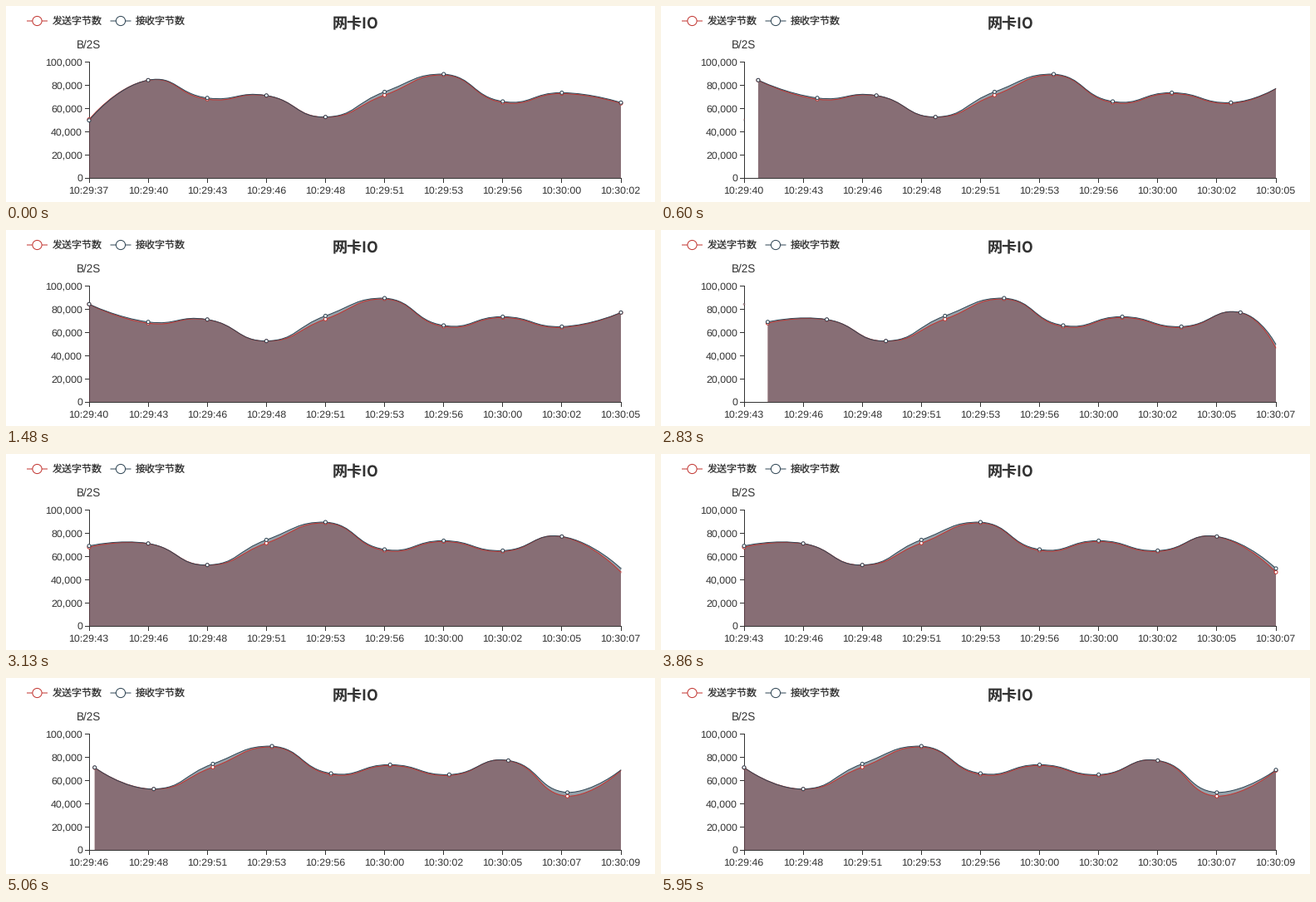
Write a matplotlib script that moves like this. It is 781 px wide and 236 px high and loops after 8000 ms.

```python
import numpy as np
import matplotlib.pyplot as plt
from matplotlib.animation import FuncAnimation
from matplotlib.colors import to_rgb
from matplotlib.patches import Circle, PathPatch
from matplotlib.path import Path

W, H, DPI = 781, 236, 64
PT = 72 / DPI                      # points per pixel
LOOP, INTERVAL = 8000, 20
LEFT, RIGHT, TOP, BASE = 100, 740, 67, 207
SHOWN = 10
STEP = (RIGHT - LEFT) / (SHOWN - 1)
RED, NAVY, INK = "#c23531", "#2f4554", "#333333"

plt.rcParams["text.hinting"] = "none"

# Thousands of bytes per sample
SENT = [50.3, 84.0, 67.7, 70.7, 52.3, 71.2, 88.6, 64.9, 72.5, 64.1, 76.7, 46.2, 68.3]
RECEIVED = [49.5, 84.1, 68.8, 70.9, 52.4, 74.0, 89.3, 65.8, 73.3, 64.8, 76.9, 49.4, 68.8]
TIMES = ["10:29:%02d" % s for s in (37, 40, 43, 46, 48, 51, 53, 56)]
TIMES += ["10:30:%02d" % s for s in (0, 2, 5, 7, 9)]

# (time the new sample shows, how far its tween has run by then), in ms
SHIFTS = [(600, 114), (2830, 79), (4910, 17)]
TICK = 146.5                       # screen refresh while tweening
SLIDE, GROW = 300, 1000


def to_y(values):
    return BASE - np.asarray(values) * (BASE - TOP) / 100


def smooth_path(pts, k=0.5):
    """Cubic curve through pts, handles kept inside their bounding box."""
    lo, hi = pts.min(axis=0), pts.max(axis=0)
    verts, handle = [pts[0]], pts[0]
    for i in range(1, len(pts)):
        p = pts[i]
        before = after = p
        if i < len(pts) - 1:
            span = pts[i + 1] - pts[i - 1]
            a = np.hypot(*(p - pts[i - 1]))
            b = np.hypot(*(pts[i + 1] - p))
            before = p - span * k * a / (a + b)
            after = p + span * k * b / (a + b)
        verts += [np.clip(handle, lo, hi), np.clip(before, lo, hi), p]
        handle = after
    return Path(verts, [Path.MOVETO] + [Path.CURVE4] * (len(verts) - 1))


def area_path(curve):
    v = curve.vertices
    foot = [(v[-1, 0], BASE), (v[0, 0], BASE), v[0]]
    codes = list(curve.codes) + [Path.LINETO, Path.LINETO, Path.CLOSEPOLY]
    return Path(np.vstack([v, foot]), codes)


fig = plt.figure(figsize=(W / DPI, H / DPI), dpi=DPI, facecolor="white")
ax = fig.add_axes([0, 0, 1, 1])
ax.set_xlim(0, W)
ax.set_ylim(H, 0)
ax.axis("off")


def stroke(xs, ys, color=INK):
    ax.plot(xs, ys, color=color, lw=PT, zorder=1, solid_capstyle="butt", snap=False)


def label(x, y, text, size=12.4, font="Liberation Sans", **kw):
    return ax.text(x, y, text, fontsize=size * PT, fontfamily=font,
                   color=INK, va="baseline", **kw)


def rgba(color, alphas):
    rgb = to_rgb(color)
    return np.array([(*rgb, a) for a in alphas])


class Series:
    def __init__(self, values, color, z):
        self.ys, self.color = to_y(values), color
        blank = Path([(0, 0), (0, 0)])
        self.area = PathPatch(blank, fc=color, ec="none", lw=0, alpha=0.5, zorder=2 + z)
        self.line = PathPatch(blank, fc="none", ec=color, lw=PT, zorder=4 + z,
                              joinstyle="bevel", capstyle="butt")
        ax.add_patch(self.area)
        ax.add_patch(self.line)
        self.dots = ax.scatter([], [], linewidths=PT, zorder=6 + z)

    def update(self, first, xs, slide, grow):
        ys = self.ys[first:first + SHOWN]
        pts = np.column_stack([xs, ys])
        curve = smooth_path(pts)
        self.line.set_path(curve)
        self.area.set_path(area_path(curve))

        scale = np.ones(SHOWN)
        scale[-1] = grow
        if slide > 0:              # the dropped sample shrinks on the axis
            pts = np.vstack([pts, (LEFT, self.ys[first - 1])])
            scale = np.append(scale, slide)
        self.dots.set_offsets(pts)
        self.dots.set_sizes((4 * PT * scale) ** 2)
        self.dots.set_facecolor(rgba("white", scale))
        self.dots.set_edgecolor(rgba(self.color, scale))


# Axes
stroke([LEFT + 0.5] * 2, [TOP, BASE + 1])
stroke([LEFT, RIGHT + 1], [BASE + 0.5] * 2)
for n in range(6):
    y = BASE - 28 * n
    stroke([LEFT - 5, LEFT], [y + 0.5] * 2)
    label(92, y + 4, f"{20000 * n:,}", ha="right")
time_labels = []
for n in range(SHOWN):
    x = LEFT + STEP * n
    stroke([int(x) + 0.5] * 2, [BASE, BASE + 6])
    time_labels.append(label(x - 0.4, 226, "", ha="center"))
label(100, 51, "B/2S", size=13.5, ha="center")

# Title and legend
CJK = "Noto Sans CJK JP"
label(421, 27, "网卡IO", size=18, font=CJK, weight="bold", ha="center")
for x, text, color in ((25, "发送字节数", RED), (125.5, "接收字节数", NAVY)):
    stroke([x, x + 25], [18] * 2, color)
    ax.add_patch(Circle((x + 12.5, 18), 5.6, fc="white", ec=color, lw=PT, zorder=2))
    label(x + 30.5, 22, text, size=12, font=CJK, ha="left")

series = [Series(SENT, RED, 0), Series(RECEIVED, NAVY, 1)]


def draw(i):
    t = i * INTERVAL + INTERVAL / 2
    first, elapsed = 0, GROW
    for n, (start, lead) in enumerate(SHIFTS, 1):
        if t >= start:
            first = n
            elapsed = lead + TICK * ((t - start) // TICK)
    slide = (1 - min(elapsed / SLIDE, 1)) ** 3
    grow = min(elapsed / GROW, 1)

    xs = LEFT + STEP * (np.arange(SHOWN) + slide)
    xs[-1] = RIGHT                 # the newest sample stays at the edge
    for s in series:
        s.update(first, xs, slide, grow)
    for text, stamp in zip(time_labels, TIMES[first:]):
        text.set_text(stamp)
    return []


anim = FuncAnimation(fig, draw, frames=LOOP // INTERVAL, interval=INTERVAL,
                     init_func=lambda: draw(0), repeat=True, repeat_delay=0)
plt.show()
```
